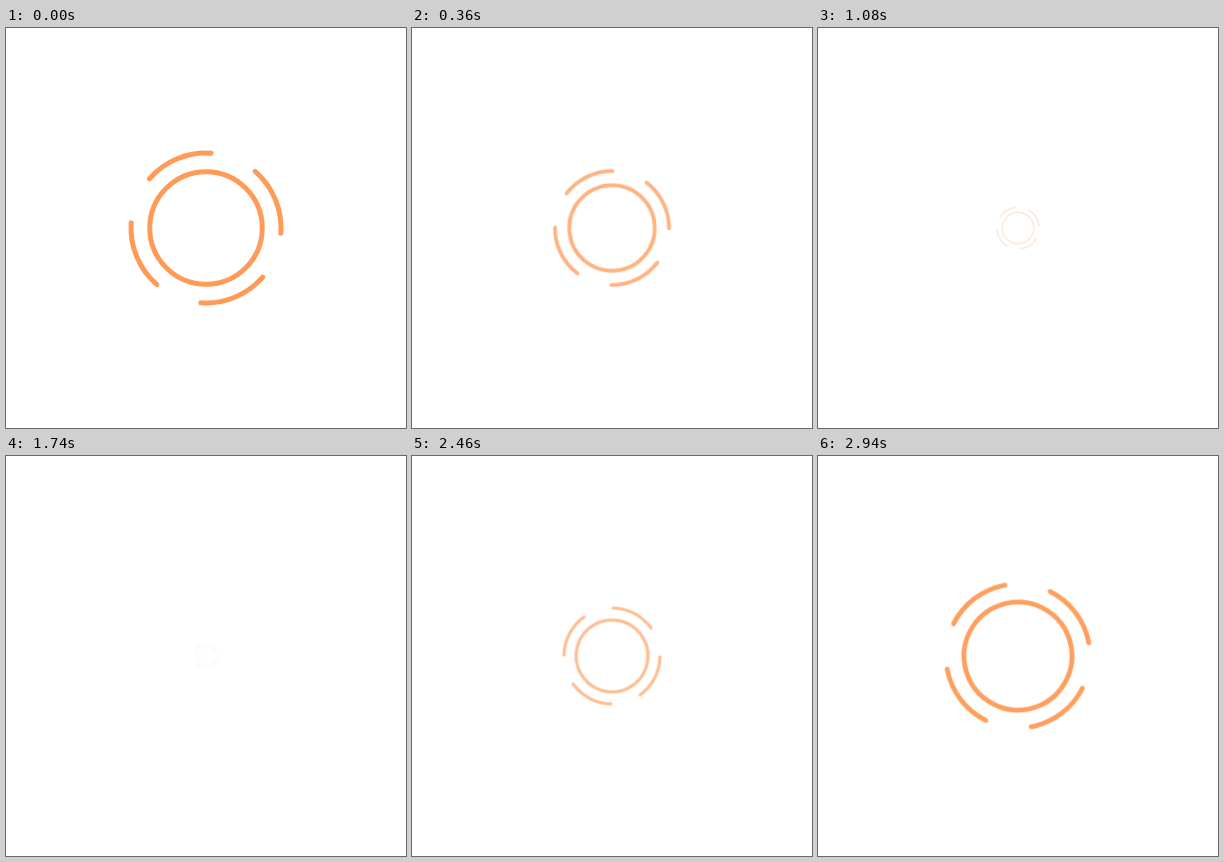
An HTML page for the animation above (3000 ms loop, 400 px wide and 400 px high).

```html
<!DOCTYPE html>
<html lang="en">
<head>
<meta charset="utf-8">
<title>Loader</title>
<style>
  html, body { margin: 0; width: 100%; height: 100%; overflow: hidden; background: #fff; }
  svg { display: block; width: 100%; height: 100%; }
  circle { fill: none; stroke: #ff9b57; stroke-width: 5; }
  .arcs { stroke-linecap: round; stroke-dasharray: 53 37; }
</style>
</head>
<body>
<svg viewBox="-200 -200 400 400">
  <g id="loader">
    <circle r="56.25"/>
    <circle class="arcs" r="75" pathLength="360" transform="rotate(-49.1)"/>
  </g>
</svg>
<script>
  const LOOP = 3000;
  const STEP = 60;

  // Two full turns per loop while shrinking and fading to nothing, then back.
  const pose = (angle, size) => ({
    transform: `rotate(${angle}deg) scale(${size})`,
    opacity: size,
    easing: `steps(${LOOP / 2 / STEP}, end)`
  });

  document.getElementById("loader").animate(
    [pose(0, 1), pose(360, 0), pose(720, 1)],
    { duration: LOOP, iterations: Infinity }
  );
</script>
</body>
</html>
```
